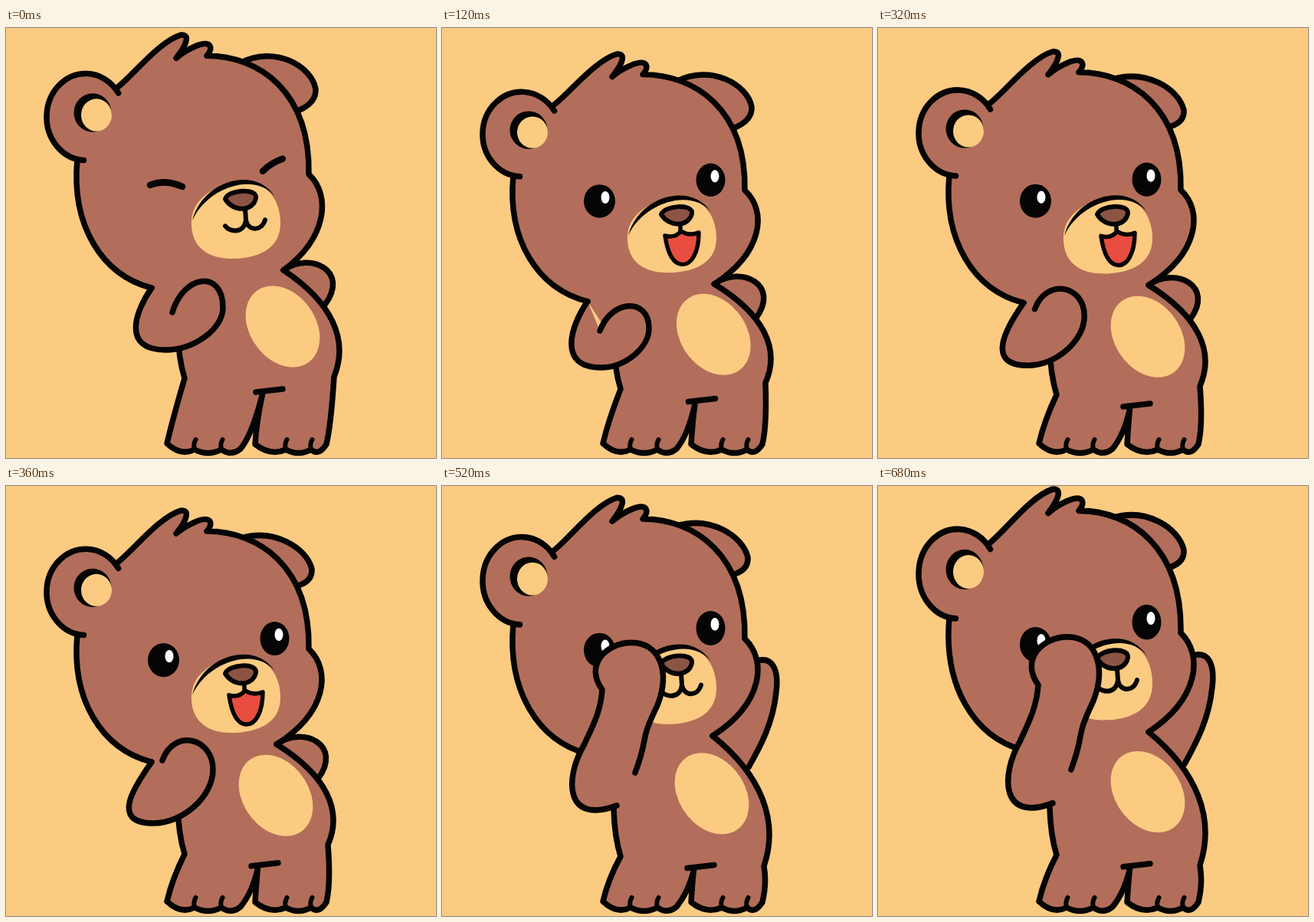
An HTML page with a canvas for the animation above (0.72 s loop, 561 by 561 pixels).

```html
<!DOCTYPE html>
<html lang="en">
<head>
<meta charset="utf-8">
<title>Peekaboo bear</title>
<style>
html, body { margin: 0; width: 100%; height: 100%; overflow: hidden; background: #fbcb82; }
canvas { display: block; width: 561px; height: 561px; }
</style>
</head>
<body>
<canvas id="stage" width="561" height="561"></canvas>
<script>
const ctx = document.getElementById('stage').getContext('2d');
const CREAM = '#fbcb82', FUR = '#b26e5a', INK = '#050404', NOSE = '#8c5445', RED = '#e84d40';
const LOOP = 720, TICK = 40, OPEN_EYES = 80, RAISE = 440;
const HELD = [240, 400, 480, 640]; // ticks on which the picture does not change

// top, bottom: vertical shift of the head at crown and neck; crouch: how far the hips sink;
// perk: lift of the far ear; elbow, paw, tip, curl: the near arm while it is lowered.
const POSES = [
  { time: 0, top: -18, bottom: -15, crouch: 0, perk: 1, elbow: [208, 420], paw: [283, 365], tip: [217, 371], curl: 50 },
  { time: 120, top: 7, bottom: 3, crouch: 0.5, perk: 1, elbow: [207, 443], paw: [270, 392], tip: [206, 395], curl: 41 },
  { time: 200, top: 0, bottom: 0, crouch: 0.55, perk: 0, elbow: [205, 441], paw: [267, 394], tip: [206, 393], curl: 38 },
  { time: 360, top: 5, bottom: 6, crouch: 0.83, perk: 0, elbow: [192, 440], paw: [270, 370], tip: [204, 358], curl: 42 },
  { time: 440, top: 1, bottom: 1, crouch: 1, perk: 0 },
  { time: 560, top: -18, bottom: -8, crouch: 0.91, perk: 0 },
  { time: 680, top: -23, bottom: -10, crouch: 0.87, perk: 0 }
];

const JAW = 'C124,337 85,272 93,188';
const HAIR = 'C165,80 200,35 228,27 C240,26 237,38 222,57 C235,46 260,33 266,41 Q269,46 262,54';
const CROWN = 'C330,54 397,100 395,207';
const RAISED_ARM = 'M228,420 C160,445 160,385 185,343 C197,318 207,300 209,272 ' +
  'C185,240 215,212 247,212 C285,212 298,250 281,292 C255,345 272,325 252,378';
const RAISED_FAR_ARM = 'M412,235 C430,230 440,245 436,275 C432,315 415,345 400,371';

const mix = (a, b, u) => Array.isArray(a) ? a.map((v, i) => mix(v, b[i], u)) : a + (b - a) * u;

function poseAt(time) {
  const i = POSES.findLastIndex(p => p.time <= time);
  const a = POSES[i], b = POSES[i + 1];
  if (!b || a.time === time) return a;
  const u = (time - a.time) / (b.time - a.time);
  return Object.fromEntries(Object.keys(b).map(k => [k, mix(a[k], b[k], u)]));
}

function fill(color, d) {
  ctx.fillStyle = color;
  ctx.fill(new Path2D(d));
}
function line(d, width = 7.5) {
  ctx.lineWidth = width;
  ctx.stroke(new Path2D(d));
}
function limb(d, root = '') {
  fill(FUR, d + root);
  line(d);
}
function oval(color, x, y, rx, ry) {
  ctx.fillStyle = color;
  ctx.beginPath();
  ctx.ellipse(x, y, rx, ry, 0, 0, Math.PI * 2);
  ctx.fill();
}

const headShift = (p, y) => mix(p.top, p.bottom, (y - 24) / 308);
function inHead(p, draw) {
  const stretch = (p.bottom - p.top) / 308;
  ctx.save();
  ctx.transform(1, 0, 0, 1 + stretch, 0, p.top - 24 * stretch);
  draw();
  ctx.restore();
}

// Places of the joints that follow from the pose.
function jointsOf(p, raised) {
  const lean = Math.min(1, 1.5 * p.crouch);
  return {
    neck: [362 - 9 * lean, 331 + headShift(p, 331)],
    chin: [190, 354 + headShift(p, 354)],
    hip: [233, 457 + 28 * p.crouch],
    waist: [428 - 8 * lean, 455 + 16 * p.crouch + (raised ? 26 : 0)],
    bar: [326 - 6 * lean, 475 + 25 * p.crouch]
  };
}

function toes(start, ends, lastY) {
  let x = start;
  return ends.map((end, i) => {
    const bump = `Q${(x + end) / 2},559 ${end},${i === ends.length - 1 ? lastY : 550}`;
    x = end;
    return bump;
  }).join('');
}

function drawBody({ neck, chin, hip, waist, bar }, part) {
  const [nx, ny] = neck, [hx, hy] = hip, [wx, wy] = waist, [bx, by] = bar;
  const at = (u, v) => `${mix(nx, wx, u)},${mix(ny, wy, v)}`;
  const fork = `${bx + 8.5},${by + 3}`;
  const outline = `${hx - 9},${hy - 62} Q${hx - 8},${hy - 26} ${hip} Q217,512 210,542` +
    toes(210, [246, 281, 306], 549) + `Q321,531 ${fork} Q327,512 325,543` +
    toes(325, [365, 398, 418], 543) + `Q424,518 ${waist} C${at(1.3, 0.65)} ${at(0.95, 0.3)} ${neck}`;
  if (part === 'fill') return fill(FUR, `M${chin} L${outline} L270,290Z`);
  line('M' + outline);
  line(`M${bar} l35,-4`);
  for (const x of [246, 281, 365, 398]) line(`M${x + 1.5},537 Q${x - 2},543 ${x},550`, 6);
}

function drawHead({ neck }) {
  const cheek = `C425,235 418,290 ${neck[0]},331`;
  const ear = new Path2D();
  ear.ellipse(104, 133, 51, 56, 0, 1.62, 5.7);
  ctx.fillStyle = FUR;
  ctx.fill(ear);
  fill(FUR, `M190,354${JAW} L145,95${HAIR}${CROWN}${cheek}Z`);
  line(`M190,354${JAW} M145,95${HAIR}${CROWN}${cheek}`);
  ctx.stroke(ear);
  oval(INK, 113, 127.5, 24.5, 25);
  oval(CREAM, 118, 130.5, 20, 21);
}

function drawFace(eyesOpen, mouthOpen) {
  if (eyesOpen) {
    for (const [x, y, r, glint] of [[205.5, 221.5, 20.5, 213], [350.5, 193.5, 19, 356]]) {
      oval(INK, x, y, r, 22);
      oval('#fff', glint, y - 5, 5.5, 8.2);
    }
  } else {
    line('M188,221 Q207,213 230,223 M335,203 Q345,193 361,187', 8.5);
  }
  fill(CREAM, 'M242,266 C244,235 280,217 310,217 C345,217 358,245 358,270 ' +
    'C358,300 335,314 300,316 C262,318 240,300 242,266Z');
  fill(INK, 'M243,267 C256,215 325,195 351,236 C325,203 262,224 243,267Z');
  if (mouthOpen) {
    const jaws = 'M291,267 Q304,271 312,261 Q322,268 335,263 C335,290 325,306 313,305 C300,304 294,288 291,267Z';
    fill(RED, jaws);
    line(jaws + 'M311,253V261', 5.5);
  } else {
    line('M312,252 L313,266 C311,284 292,282 286,274 M313,266 C315,280 333,282 338,266', 6);
  }
  const nose = 'M286,239 C290,227 328,224 326,238 C322,256 296,256 286,239Z';
  fill(NOSE, nose);
  line(nose, 6);
}

function drawBelly({ neck, hip }) {
  const middle = (neck[1] + hip[1]) / 2;
  ctx.save();
  ctx.transform(1, 0, 0.25, 1, neck[0] - 1, 400.5 + 0.65 * (middle - 403.5));
  oval(CREAM, 0, 0, 46.5, 53);
  ctx.restore();
}

function loweredArm({ elbow: [ex, ey], paw: [px, py], tip: [tx, ty], curl }, [cx, cy]) {
  return `M${cx},${cy} C${cx - 22},${cy + 31} ${ex - 57},${ey} ${ex},${ey}` +
    `C${(ex + px) / 2},${ey} ${px},${(ey + py) / 2} ${px},${py}` +
    `C${px},${py - curl} ${tx + 15},${ty - curl} ${tx},${ty}`;
}

function render(time) {
  const p = poseAt(time), raised = time >= RAISE, joints = jointsOf(p, raised);
  const k = p.perk;
  ctx.lineCap = ctx.lineJoin = 'round';
  ctx.strokeStyle = INK;
  ctx.fillStyle = CREAM;
  ctx.fillRect(0, 0, 561, 561);

  if (raised) inHead(p, () => limb(RAISED_FAR_ARM, 'L354,331Z'));
  else limb(`M${joints.neck} c35,-25 87,1 54,45`);
  inHead(p, () => limb(`M306,63 C350,${50 - 10 * k} ${392 + 7 * k},${75 - 8 * k} ` +
    `${399 + 5 * k},${103 - 6 * k} Q${400 + 5 * k},${118 - 4 * k} 383,124`, 'L340,110Z'));
  drawBody(joints, 'fill');
  inHead(p, () => drawHead(joints));
  drawBody(joints, 'line');
  drawBelly(joints);
  inHead(p, () => {
    drawFace(time >= OPEN_EYES, time >= OPEN_EYES && !raised);
    if (raised) limb(RAISED_ARM);
  });
  if (!raised) limb(loweredArm(p, joints.chin));
}

function tick() {
  const now = Math.floor(performance.now() % LOOP / TICK) * TICK;
  render(HELD.includes(now) ? now - TICK : now);
  requestAnimationFrame(tick);
}
tick();
</script>
</body>
</html>
```
